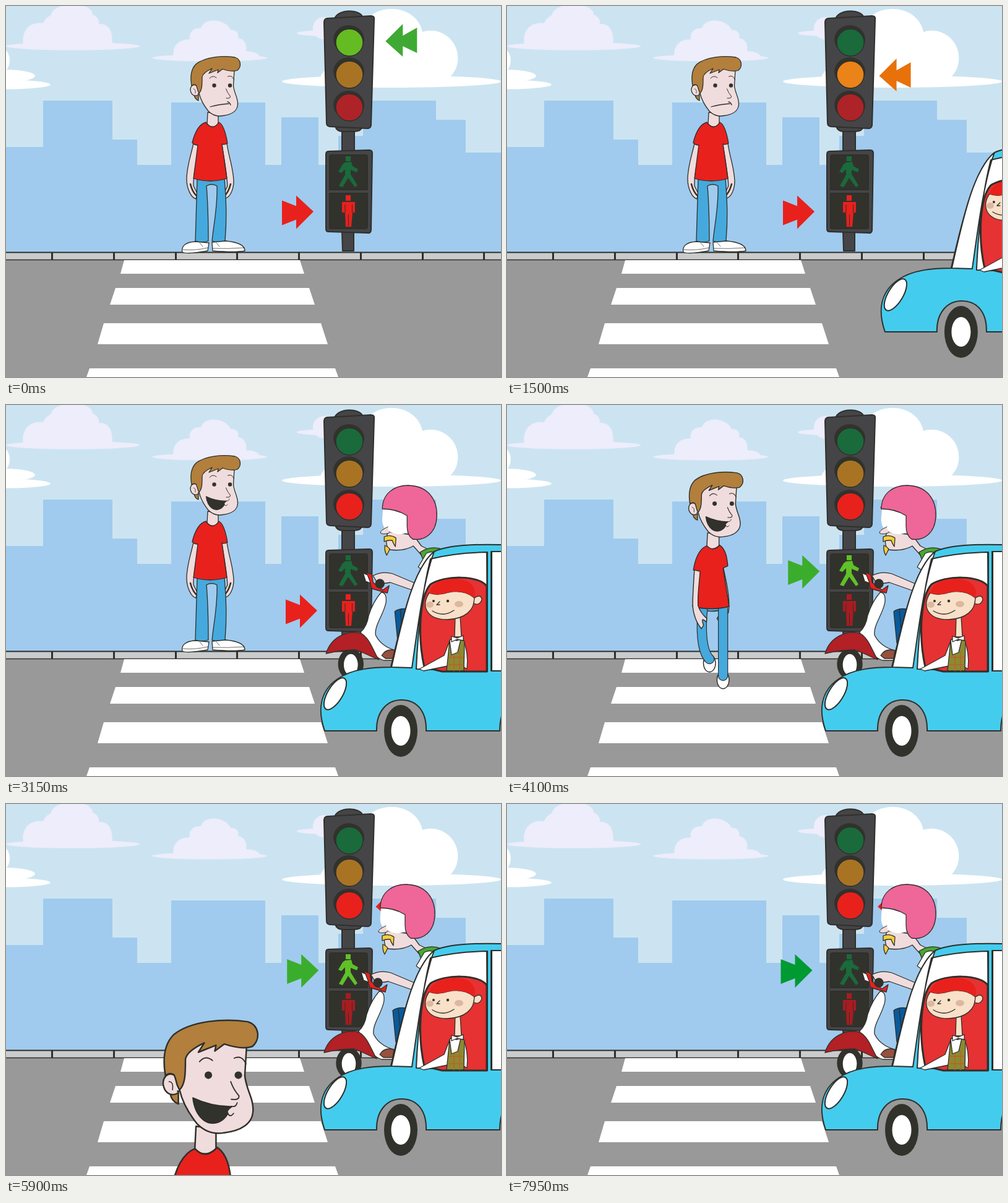
Animation of 800 by 600 pixels, one loop 8 s. Source, as an HTML page:

```html
<!DOCTYPE html>
<html lang="en">
<head>
<meta charset="utf-8">
<title>Crossing the road</title>
<style>
html, body { margin: 0; height: 100%; overflow: hidden; }
svg { display: block; width: 100vw; height: 100vh; }
.ink { stroke: #2f2f2b; stroke-width: 1.3; stroke-linejoin: round; stroke-linecap: round; }
.car { stroke-width: 3; }
.line { fill: none; }
.dark { fill: #32322d; }
.white { fill: #fff; }
.skin { fill: #f0dcdc; }
.hair { fill: #b27f3c; }
.red { fill: #e8211d; }
.jeans { fill: #45a9dd; }
.leg { fill: none; stroke: #2f2f2b; stroke-width: 15; }
.leg.cloth { stroke: #45a9dd; stroke-width: 12.8; }
</style>
</head>
<body>
<svg viewBox="0 0 800 600" preserveAspectRatio="none">
  <!-- Sky, town and road -->
  <path fill="#cce4f1" d="M0 0H800V600H0Z"/>
  <g fill="#ededfc">
    <ellipse cx="108" cy="65" rx="108" ry="6.5"/>
    <path d="M28 65C24 40 38 25 60 28C63 20 68 18 73 14C77-8 140-8 140 14C148 17 151 23 150 29C167 28 174 42 171 65Z"/>
    <ellipse cx="329" cy="84" rx="93" ry="5.5"/>
    <path d="M271 84C268 66 277 54 297 54C295 40 306 35 315 36C320 18 355 20 363 39C371 38 377 43 375 52C386 53 390 64 388 73Q409 74 410 83Z"/>
    <ellipse cx="520" cy="44" rx="50" ry="5"/><circle cx="514" cy="36" r="18"/>
  </g>
  <g class="white">
    <ellipse cx="623" cy="122" rx="177" ry="10"/>
    <path d="M508 120C508 105 520 100 532 102C520 60 550 30 580 25C602-6 664-2 673 42C702 32 734 56 730 90Q728 106 716 116Z"/>
    <ellipse cy="113" rx="47" ry="10"/><ellipse cy="127" rx="72" ry="7.5"/><circle cx="-20" cy="88" r="26"/>
  </g>
  <path fill="#a0cbee" d="M0 228H60V153H172V216H212V257H267V156H419V257H445V180H505V257H537V210H577V153H695V184H743V237H800V400H0Z"/>
  <path fill="#999" d="M0 410H800V600H0Z"/>
  <path fill="#c9cbcc" d="M0 398H800V410H0Z"/>
  <path class="ink line" style="stroke-width:2" d="M0 398.500H800"/>
  <path class="ink line" d="M0 410.500H800"/>
  <path class="ink line" style="stroke-width:3;stroke-linecap:butt" d="M74.500 398v12m100-12v12m100-12v12m99-12v12m100-12v12m100-12v12m100-12v12m99-12v12"/>
  <path class="white" d="M191 411H475L482 433H185ZM177 456H490L499 483H168ZM158 513H509L520 547H148ZM135 586H532L537 600H130Z"/>

  <!-- Signals -->
  <g class="ink" fill="#454547" style="stroke-width:2">
    <path d="M543 200H563V236H543ZM543 365H562V396H544Z"/>
    <path d="M531 22C533 4 576 4 577 20ZM532 194H577Q574 203 563 203H545Q534 203 532 194Z"/>
    <path d="M519 20L590 16Q596 16 595 22L590 193Q589 198 584 198L523 195Q518 194 518 189L514 26Q514 21 519 20Z"/>
    <path d="M521 235L587 233Q592 233 592 238L590 363Q589 368 584 367L521 365Q517 365 517 360V240Q517 235 521 235Z"/>
    <path class="dark" d="M526 241H581Q584 241 584 244V297H523V244Q523 241 526 241ZM523 303H584V357Q584 360 581 360H526Q523 360 523 357Z"/>
  </g>
  <g class="dark"><ellipse cx="554" cy="54" rx="25" ry="23"/><ellipse cx="554" cy="106" rx="25" ry="23"/><ellipse cx="554" cy="160" rx="25" ry="23"/></g>
  <g class="ink"><circle id="lampG" cx="555" cy="59" r="22"/><circle id="lampA" cx="555" cy="111" r="22"/><circle id="lampR" cx="555" cy="164" r="22"/></g>
  <path id="manG" d="M549 243h8v8h-8ZM548 253L558 252L560 259L569 264L567 269L557 265L557 272L568 290L564 293L553 278L544 293L538 291L548 273V264L542 270L537 268L544 256Z"/>
  <path id="manR" d="M549 306h8v9h-8ZM543 317H564V334H560L558 357H549L548 334H543Z"/>
  <path class="line" stroke="#30302e" d="M548 321V334M559.500 321V334M553.500 337V356"/>
  <path id="pedArrow" d="M0 0L-28-26V-9L-51-18V22L-28 13V28Z"/>
  <path id="carArrow" d="M0 0L28-28V-9L51-22V19L28 8V25Z"/>

  <!-- Boy -->
  <g id="boy" class="ink">
    <g id="stand">
      <path class="skin" d="M303 222C298 245 292 260 292 280C292 295 299 310 307 312L309 303L303 291C302 270 310 245 311 224Z"/>
      <path class="skin" d="M357 222C360 245 367 260 368 283C368 297 362 309 355 311L352 304L358 291C357 270 352 245 349 224Z"/>
      <path class="line" d="M298 288Q301 300 307 306M363 288Q360 300 354 306" style="stroke-width:2.500"/>
      <path class="jeans" d="M309 280L306 380Q316 384 327 380C327 345 326 315 324 291Q332 286 341 291C342 325 336 350 333 380Q344 384 354 380C357 345 356 310 353 280Z"/>
      <path class="white" d="M306 381C288 382 283 390 285 398Q292 402 326 396L328 383ZM333 382L334 396Q370 399 386 396C386 388 377 382 355 380Z"/>
      <path class="line" d="M286 394Q305 396 326 391M334 392Q360 393 385 391M313 383l5 6M340 383l5 6" style="stroke-width:.7"/>
    </g>
    <g id="walk">
      <path class="skin" d="M349 222C354 245 360 270 357 290L345 306L340 299L348 286Z"/>
      <path class="jeans" d="M311 276H356L354 284Q332 292 311 285Z"/>
      <g id="legL"><ellipse class="white" rx="9" ry="13"/><path class="leg"/><path class="leg cloth"/></g>
      <g id="legR"><ellipse class="white" rx="9" ry="13"/><path class="leg"/><path class="leg cloth"/></g>
    </g>
    <path class="skin" d="M326 172L325 191Q333 200 343 191V174Z"/>
    <path id="shirt" class="red"/>
    <path id="frontArm" class="skin" d="M306.500 227C305 250 304 265 304 277C304 292 310 306 317 314L320 309C317 300 318 298 324 304L325 299C318 293 314 286 312 280C311 262 314 245 315 229Z"/>
    <path class="hair" d="M304 142Q304 150 311 153V142Z"/>
    <path class="skin" d="M312 141C314 150 319 160 327 170C334 177 342 179 350 177.500C364 176 374 170 374.500 159C375 148 369 142 367.500 129L369 104L320 98L309 125Z"/>
    <path class="skin" d="M309 129C302 125 298 130 298 136C299 143 304 147 310 144"/>
    <path class="line" d="M303 134Q307 134 306 141" style="stroke-width:.8"/>
    <path class="hair" d="M312 141C309 137 309 130 307 128Q303 126 300 129C297 112 300 101 307 94C322 82 350 80 370 83C380 86 381 98 374 104C366 107 356 104 350 102L342 108L343 103L328 109L333 101Q318 108 317 115C317 127 317 136 312 141Z"/>
    <g stroke="none" class="dark"><circle cx="336.500" cy="128.500" r="3.200"/><circle cx="362" cy="128.500" r="3.200"/></g>
    <path class="line" style="stroke-width:1" d="M329 117Q334 111 340 116M358.500 114Q365 111 368.500 119M355.500 134Q358 141 362.500 146Q363 150 356 149"/>
    <path id="sad" class="line" d="M330 163Q344 159 360 158M358 155Q362 156 363 160"/>
    <g id="happy">
      <path class="dark" d="M323.500 148Q338 155 356 155.500Q351 159 353 161C348 170 339 171 333 167Q325 161 323.500 148Z"/>
      <path class="line" style="stroke-width:.9" d="M353 161Q355 165 358 161M356 155Q360 156 361 152"/>
    </g>
  </g>

  <!-- First car -->
  <g id="car1" class="ink car">
    <path fill="#47bcd0" d="M92 534C83 508 76 470 97 443C116 416 165 400 233 399C247 340 270 288 318 269C400 247 520 247 576 267C604 290 622 340 633 399C685 398 712 428 720 470Q726 500 718 535L607 534C606 500 585 468 551 468C520 468 498 497 497 534L308 535C307 500 285 468 254 468C223 468 202 500 202 534Z"/>
    <path class="white" d="M234 402C246 350 272 299 310 277C298 315 285 360 276 404ZM323 271Q370 262 439 263L440 408L281 405C291 355 306 310 323 271ZM450 263Q520 262 564 269C588 310 599 355 607 404L449 407ZM585 288C608 318 623 360 633 402L617 404Q611 345 585 288Z"/>
    <g style="stroke-width:1.500">
      <path class="white" d="M331 405L358 365L368 350L384 349Q396 352 388 374L382 407Z"/>
      <path class="dark" d="M366 353L380 348V370L378 395H361Z"/><path fill="#f3c43c" d="M359 390L375 392L371 407H357Z"/>
      <path class="line" d="M364 360L349 405M388 365L374 407"/>
      <path fill="#f9e0d4" d="M338 292C331 304 320 330 332 339C348 351 384 350 399 337L404 300L380 288Z"/>
      <path fill="#0b3e55" d="M337 287C334 267 362 261 386 270C416 266 435 282 434 308C432 330 418 343 401 342L394 326L396 302Q392 292 376 292Q352 296 337 287Z"/>
      <circle cx="349" cy="278" r="12" fill="#4c7488" opacity=".6" stroke="none"/>
      <ellipse cx="410" cy="324" rx="6" ry="8" fill="#f9e0d4"/>
      <path class="line" style="stroke:#c98a28;stroke-width:4" d="M337 299L385 300L413 310"/>
      <path class="line" d="M337 301C336 317 355 319 356 302M359 302C360 319 382 319 383 302"/>
      <circle cx="345" cy="307" r="1.500" class="dark"/><circle cx="367" cy="306" r="1.500" class="dark"/>
      <path class="white" d="M344 334Q362 338 374 326Q366 341 351 340Z"/><path class="line" d="M345 315L338 321"/>
    </g>
    <ellipse class="white" rx="18" ry="37" transform="translate(114 455) rotate(28)"/>
    <ellipse class="red" rx="9" ry="24" transform="translate(696 442) rotate(-31)" style="stroke-width:2"/>
    <ellipse cx="710" cy="492" rx="6" ry="21" fill="#cc8440" style="stroke-width:2"/>
    <g stroke="none"><ellipse class="dark" cx="255" cy="535" rx="35.500" ry="54.500"/><ellipse class="white" cx="255" cy="535" rx="20" ry="32"/>
    <ellipse class="dark" cx="551" cy="535" rx="35.500" ry="54.500"/><ellipse class="white" cx="551" cy="535" rx="20" ry="32"/></g>
  </g>

  <!-- Scooter -->
  <g id="scooter" class="ink">
    <ellipse class="dark" cx="554" cy="419" rx="20" ry="24"/><ellipse class="white" cx="554" cy="420" rx="12" ry="18"/>
    <path fill="#085a9c" d="M625 334Q633 328 646 330V400L630 385Z"/><path class="line" d="M634 331L639 385"/>
    <path class="white" d="M603 303Q612 303 611 318C608 338 592 355 594 372Q605 395 640 400V413H607C588 407 574 385 570 367Q580 359 583 340Q590 318 603 303Z"/>
    <path fill="#97513f" d="M604 405Q611 393 627 397L625 410H610Z"/>
    <path fill="#b32025" d="M514 402C522 374 550 364 570 369C584 376 590 397 599 412Q577 402 563 396Q540 396 514 402Z"/>
    <path class="skin" d="M614 205Q608 225 616 234Q640 237 655 228L678 254L692 240L668 228L655 210Z"/>
    <path fill="#48a832" d="M666 238Q684 226 704 234V300H690Z"/>
    <path class="white" d="M663 262L676 240Q686 235 692 240L674 270Z"/>
    <path class="skin" d="M590 276Q605 268 622 273L662 290L655 300L618 287L598 290Z"/>
    <path class="red" d="M579 271L588 274L590 287L606 299L616 292L613 304L588 297Z"/><path class="white" d="M574 272L581 275L586 288L578 285Z"/><circle class="dark" cx="601" cy="289" r="7"/>
    <path class="white" stroke="none" d="M606 168Q635 164 647 179V205Q634 213 617 205Q603 200 605 180Z"/>
    <path fill="#ef6699" d="M605 168C605 143 624 130 647 130C680 131 694 154 693 180C692 207 674 220 654 217Q645 211 645 196V179Q628 168 605 168Z"/>
    <path class="skin" d="M614 197Q601 203 602 207Q606 210 616 207" style="stroke-width:1"/>
    <path fill="#f5ce3e" d="M608 213Q618 209 627 215L626 229Q622 223 621 219Q615 218 608 221ZM609 227Q614 229 617 233L612 243Q608 236 609 227Z"/>
  </g>

  <!-- Second car -->
  <g id="car2" class="ink" style="stroke-width:2">
    <path fill="#44ccee" d="M515 527C503 492 508 462 536 443C560 426 595 424 622 424C638 355 658 265 692 237C716 226 758 225 800 226C930 226 960 330 980 424C1080 425 1100 470 1092 527H878C878 450 798 450 798 527H679C680 494 663 477 639 477C615 477 598 497 599 527Z"/>
    <path class="white" d="M623 424C640 350 657 265 692 237C674 285 664 370 656 425ZM686 249Q725 239 777 238L778 431L663 427C666 360 673 300 686 249ZM785 237Q850 236 900 250L950 430H785Z"/>
    <path fill="#e63232" d="M676 424C665 375 668 310 686 290C708 275 765 275 777 293V431H705Z" style="stroke-width:3"/>
    <g style="stroke-width:1.300">
      <path fill="#f9e0c8" d="M726 342L725 375H736L734 342Z"/>
      <path class="white" d="M718 379L708 405L668 427L675 430L714 422H737L745 427Q748 400 738 377L729 381Z"/>
      <path fill="#8b8a32" d="M717 381L712 430H740L741 382L735 379L730 400L720 404Z"/>
      <path class="line" style="stroke:#c25d25" d="M716 408H739M714 420H739M724 404V430M733 398V430"/>
      <path class="white" d="M720 374L729 377L739 373V381L729 379L720 383Z"/>
      <path fill="#f9e0c8" d="M684 304C671 322 677 347 713 347C742 346 757 332 757 312Q740 298 715 303Q697 309 684 304Z"/>
      <path class="red" stroke="none" d="M684 304C687 288 704 281 725 281C748 282 762 292 757 312Q740 298 715 303Q697 309 684 304Z"/>
      <path fill="#f9e0c8" d="M757 312Q768 305 769 315Q765 325 756 321Z"/>
      <g stroke="none"><ellipse cx="685" cy="323" rx="6" ry="5" fill="#dcb8a0"/><ellipse cx="732" cy="322" rx="7" ry="5" fill="#dcb8a0"/>
      <circle class="dark" cx="691" cy="317" r="2"/><circle class="dark" cx="714" cy="317" r="2.200"/></g>
      <path class="line" d="M689 333Q707 344 724 332M701 318L696 323H701"/>
    </g>
    <path class="line" d="M778 238V431M784 237V430"/>
    <ellipse class="white" rx="12" ry="29" transform="translate(532 467) rotate(31)"/>
    <g stroke="none"><ellipse class="dark" cx="638" cy="527" rx="27" ry="42"/><ellipse class="white" cx="638" cy="527" rx="15.500" ry="24"/></g>
  </g>
</svg>
<script>
const LOOP = 8000, STEP = 50;
const CAR_AMBER = 400, CAR_RED = 2000, SMILE = 2350, PED_GREEN = 3600, WALK = 3900, BLINK = 6450;
const SHIRT_STAND = "M323 188Q334 203 344 188Q353 192 358 222Q353 225 349 223L357 279Q330 287 303 279L310 225Q304 225 301 221C305 205 312 191 323 188Z";
const SHIRT_WALK = "M325 191Q334 201 344 190C353 196 355 209 356 221L349 224L358 281Q331 288 304 281L314 229L305 227C308 208 315 195 325 191Z";

const el = id => document.getElementById(id);
const fill = (id, color) => el(id).setAttribute("fill", color);
const show = (id, on) => el(id).style.display = on ? "" : "none";
const place = (id, x, y = 0) => el(id).setAttribute("transform", `translate(${x} ${y})`);
const wave = (t, period, peak) => Math.cos(2 * Math.PI * (t - peak) / period);
const mix = (a, b, k) => `rgb(${a.map((v, i) => Math.round(v + (b[i] - v) * k))})`;

// Remaining distance of something that brakes to a stop
const brake = (t, start, end, distance) =>
  distance * (1 - Math.min(1, Math.max(0, (t - start) / (end - start)))) ** 3;

function poseLeg(id, hip, inward, lift) {
  const x = hip + inward * 14 * lift, y = 384 - 35 * lift;
  const knee = hip - inward * 4 * lift;
  const [shoe, ...cloth] = el(id).children;
  shoe.setAttribute("transform", `translate(${x} ${y + 6})`);
  for (const part of cloth)
    part.setAttribute("d", `M${hip} 284C${knee} 310 ${knee} ${350 - 5 * lift} ${x} ${y}`);
}

function drawSignals(t) {
  const green = t < CAR_AMBER, red = t >= CAR_RED, amber = !green && !red;
  fill("lampG", green ? "#64bc22" : "#1a6a3c");
  fill("lampA", amber ? "#ea8318" : "#a87424");
  fill("lampR", red ? "#e8211d" : "#ae2327");

  const go = t >= PED_GREEN;
  const lit = go && (t < BLINK || Math.floor((t - BLINK) / 500) % 2 === 0);
  fill("manG", lit ? "#5fc127" : "#1a6a3c");
  fill("manR", go ? "#a81c20" : "#e8211d");

  const swing = wave(t, 900, 4800);
  place("pedArrow", go ? 503.5 + 10 * swing : 500 + 6 * swing, go ? 269 : 332.5);
  fill("pedArrow", go ? mix([0, 154, 51], [100, 187, 40], (swing + 1) / 2) : "#e8211d");

  const sway = red ? wave(t, 650, 5607) : wave(t, 700, 5550);
  const [x, y, color] = green ? [607 + 7 * sway, 57, "#3faa33"]
    : amber ? [600 + 7 * sway, 113, "#e8710a"]
    : [607 + 10 * sway, 166, "#e8211d"];
  place("carArrow", x, y);
  fill("carArrow", color);
}

function drawBoy(t) {
  const walking = t >= WALK;
  const scale = 1 + 0.00045 * Math.max(0, t - WALK);
  el("boy").setAttribute("transform", `translate(347 -216) scale(${scale}) translate(-347 216)`);
  el("shirt").setAttribute("d", walking ? SHIRT_WALK : SHIRT_STAND);
  show("stand", !walking);
  show("walk", walking);
  show("frontArm", walking);
  show("sad", t < SMILE);
  show("happy", t >= SMILE);
  const stride = wave(t, 800, 4800);
  poseLeg("legL", 319, 1, Math.max(0, stride));
  poseLeg("legR", 349, -1, Math.max(0, -stride));
}

function frame() {
  const t = Math.floor(performance.now() % LOOP / STEP) * STEP;
  drawSignals(t);
  drawBoy(t);
  place("car1", (600 - t) * 1.2);
  place("car2", brake(t, 1200, 2160, 295));
  place("scooter", brake(t, 2450, 3350, 300));
  requestAnimationFrame(frame);
}
frame();
</script>
</body>
</html>
```
